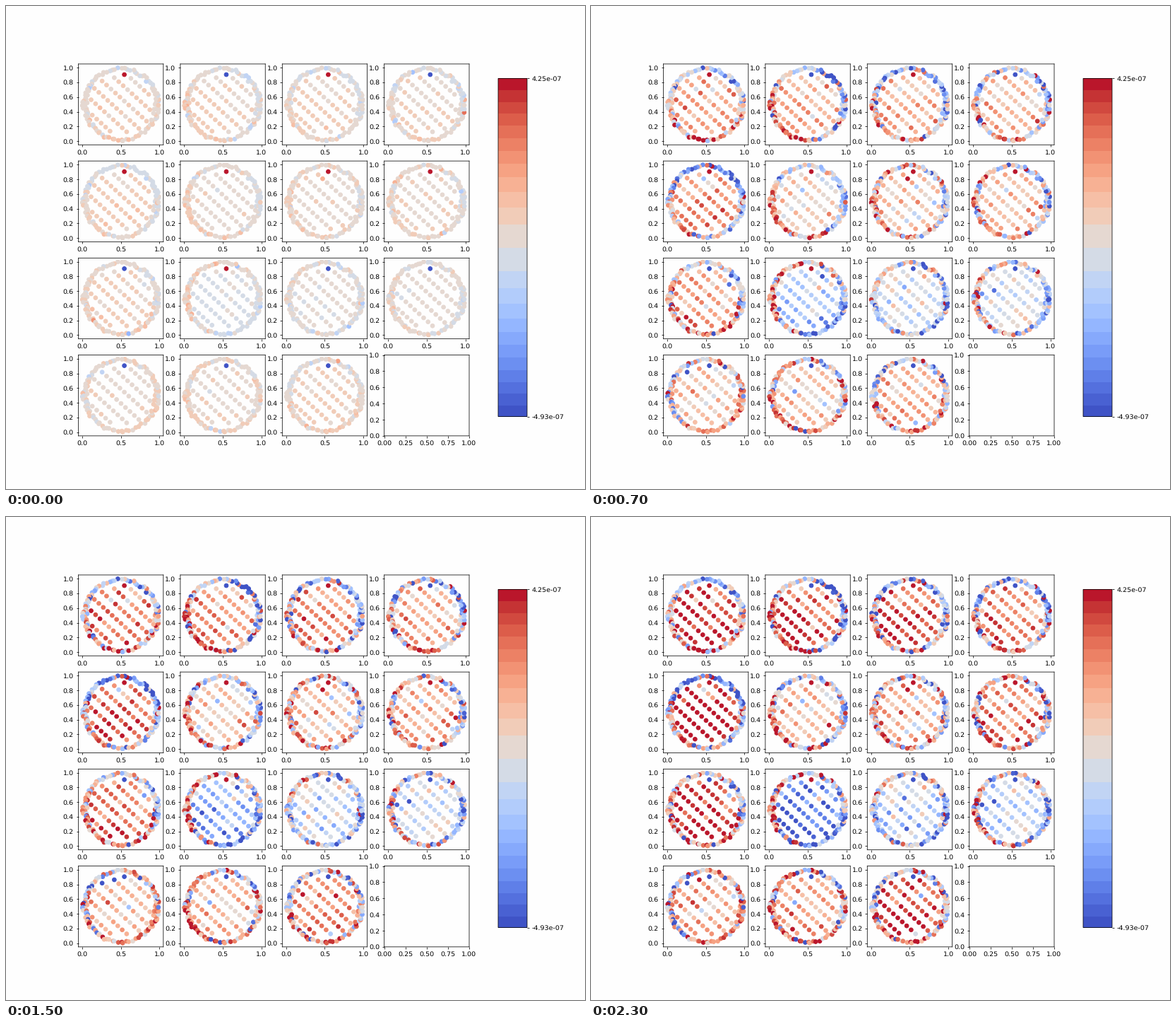
Write a matplotlib script that moves like this. It is 820 px wide and 683 px high and loops after 2.4 s.

```python
import numpy as np
import matplotlib.pyplot as plt
from matplotlib.animation import FuncAnimation
from matplotlib.cm import ScalarMappable
from matplotlib.colors import ListedColormap, Normalize

FRAMES = 24
PANELS = 15
VMIN, VMAX = -4.93e-7, 4.25e-7
PAPER = "#fefefe"

# Mean interior level of each panel, -1 to 1 over the colour range
MEAN = [.65, .55, .6, .4, .8, .2, .2, .4, .65, -.6, -.25, -.2, .25, .3, .6]
# Panels whose source point near the top is negative
SINKS = [1, 3, 8, 10, 11, 12, 13, 14]
SOURCE = (.545, .905)

rng = np.random.default_rng(11)


def banded_cmap(bands=24, n=480):
    """Coolwarm in flat bands that get wider towards the middle."""
    s = np.linspace(-1, 1, bands + 1)
    edges = .5 + .5 * np.sign(s) * np.abs(s) ** .8
    mids = (edges[1:] + edges[:-1]) / 2
    pos = (np.arange(n) + .5) / n
    return ListedColormap(plt.get_cmap("coolwarm")(mids[np.searchsorted(edges, pos) - 1]))


def make_points(n_rim=112):
    """A rim crowded at the sides, diagonal rows inside, the source last."""
    t = np.linspace(0, 2 * np.pi, n_rim, endpoint=False)
    a = t - .2 * np.sin(2 * t) + rng.normal(0, .02, n_rim)
    r = .5 - .065 * rng.random(n_rim) * (.25 + .75 * np.abs(np.cos(a)))
    rim = np.c_[.5 + r * np.cos(a), .5 + r * np.sin(a)]

    i, k = np.meshgrid(np.arange(-8, 9), np.arange(-2, 4))
    shift = .1 * k - .055
    rows = np.c_[(.5 + .0575 * i + shift).ravel(), (.5 - .0545 * i + shift).ravel()]
    rows = rows[np.hypot(*(rows - .5).T) < .42]
    rows = rows[np.hypot(*(rows - SOURCE).T) > .04]
    return np.vstack([rim, rows, [SOURCE]])


pts = make_points()
dx, dy = (pts - .5).T
rad = np.hypot(dx, dy)
cos, sin = dx / rad, dy / rad
inner = rad < .42

shape = (PANELS, len(pts))
noise = rng.standard_t(4, (2, *shape)) * np.where(inner, .13, .33)
speed = rng.uniform(.3, .9, shape)
lean = rng.normal(0, .15, (PANELS, 2))


def field(p, f):
    grow = min(1, .2 + .2 * f)
    level = MEAN[p] * (1 + .4 * np.cos(2 * np.pi * (f - 4) / 6.4))
    body = level * (1 - .7 * (dx + dy))
    edge = (lean[p, 0] - .2) * cos + lean[p, 1] - .1 * np.abs(cos) - .5 * MEAN[p] * sin
    wave = noise[0, p] + .6 * noise[1, p] * np.sin(speed[p] * f)
    v = grow * (np.where(inner, body, edge) + (1 + .02 * f) * wave)
    v[-1] = -1 if p in SINKS else 1
    return np.where(v > 0, v * VMAX, -v * VMIN)


# Soft, unsnapped lines and glyphs
plt.rcParams.update({"path.snap": False, "text.hinting": "none",
                     "figure.facecolor": PAPER, "axes.facecolor": PAPER})

DPI = 820 / 12
fig, axes = plt.subplots(4, 4, figsize=(12, 683.005 / DPI), dpi=DPI)
fig.subplots_adjust(left=.125, right=.8, bottom=.11, top=.88, wspace=.2, hspace=.2)
cmap, norm = banded_cmap(), Normalize(VMIN, VMAX)

dots = []
for p, ax in enumerate(axes.flat[:PANELS]):
    dots.append(ax.scatter(*pts.T, c=field(p, 0), cmap=cmap, norm=norm))
    ax.set(xlim=(-.05, 1.05), ylim=(-.05, 1.05))

bar = fig.colorbar(ScalarMappable(norm, cmap), cax=fig.add_axes([.85, .15, .05, .7]))
bar.set_ticks([VMIN, VMAX], labels=[f"{v:.2e}" for v in (VMIN, VMAX)])


def update(f):
    for p, d in enumerate(dots):
        d.set_array(field(p, f))
    return dots


anim = FuncAnimation(fig, update, frames=FRAMES, interval=100, repeat=True, repeat_delay=0)
plt.show()
```
